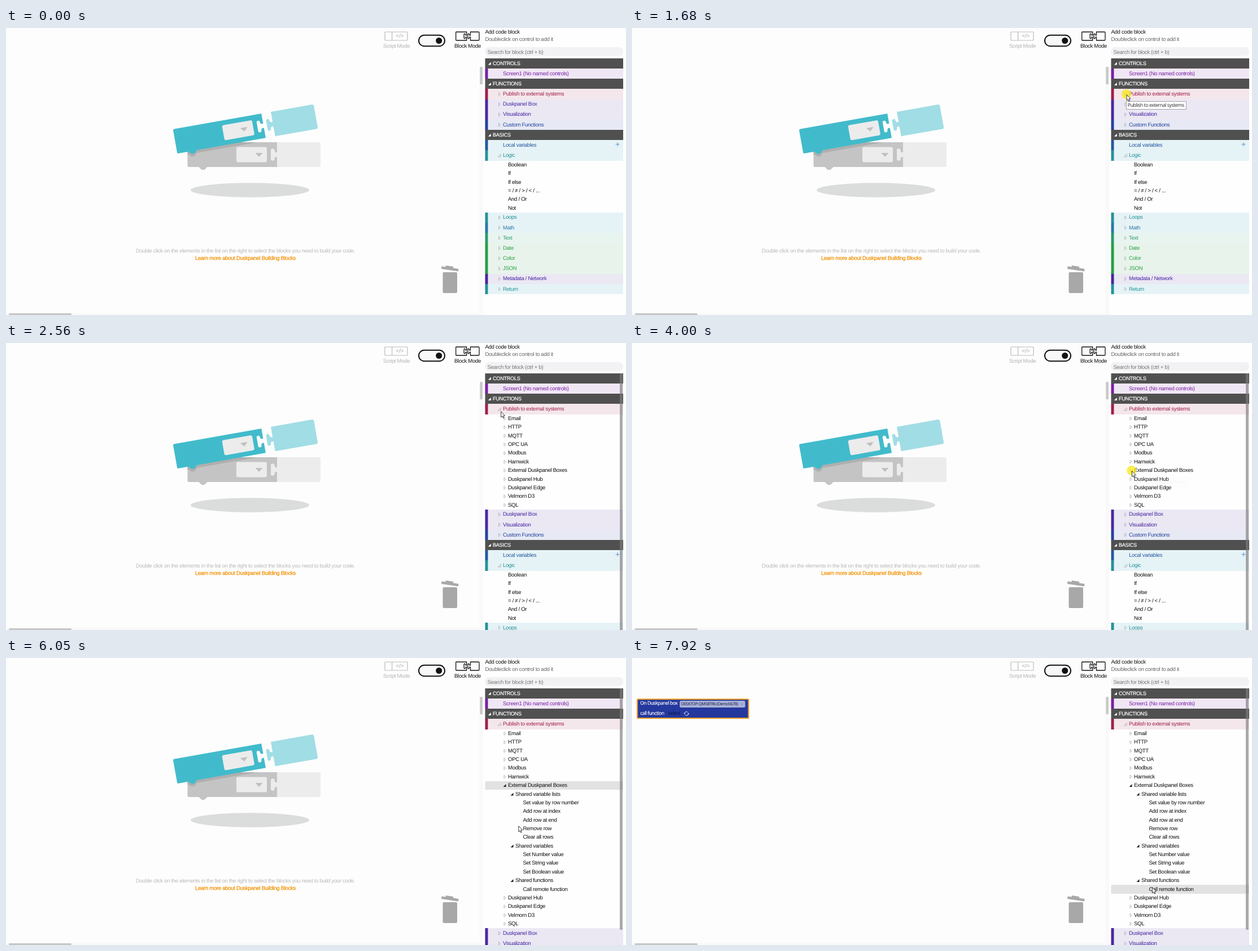
Write an HTML page with a canvas that moves like this. It is 1098x510 px and loops after 8000 ms.

```html
<!DOCTYPE html>
<html lang="en">
<head>
<meta charset="utf-8">
<title>Adding a code block</title>
<style>
  html, body { margin: 0; height: 100%; overflow: hidden; background: #fdfdfd; }
  canvas { display: block; }
</style>
</head>
<body>
<canvas id="stage" width="1098" height="510"></canvas>
<script>
const c = document.getElementById('stage').getContext('2d');
const LOOP = 8000;
const UI = '"Liberation Sans", Arial, sans-serif';
const HINT = '"Open Sans", "Noto Sans", sans-serif';

// ---------- drawing helpers ----------
function text(str, x, y, color, { size = 9.6, font = UI, gap = -0.32, align = 'left', bold = 0 } = {}) {
  c.font = `${size}px ${font}`;
  c.letterSpacing = gap + 'px';
  c.textRendering = 'geometricPrecision';
  c.textBaseline = 'middle';
  c.textAlign = align;
  c.fillStyle = c.strokeStyle = color;
  c.fillText(str, x, y);
  if (bold) { c.lineWidth = bold; c.strokeText(str, x, y); }
}

function box(x, y, w, h, color, r = 0) {
  c.fillStyle = color;
  c.beginPath();
  c.roundRect(x, y, w, h, r);
  c.fill();
}

function outline(x, y, w, h, color, width, r = 0) {
  c.strokeStyle = color;
  c.lineWidth = width;
  c.beginPath();
  c.roundRect(x, y, w, h, r);
  c.stroke();
}

function shape(points, fill, stroke, width = 0.8) {
  c.beginPath();
  points.forEach(([x, y]) => c.lineTo(x, y));
  c.closePath();
  if (fill) { c.fillStyle = fill; c.fill(); }
  if (stroke) { c.strokeStyle = stroke; c.lineWidth = width; c.stroke(); }
}

function disc(x, y, rx, ry, color) {
  c.fillStyle = color;
  c.beginPath();
  c.ellipse(x, y, rx, ry, 0, 0, 7);
  c.fill();
}

// Puzzle knob bulging left from a vertical edge; dir 1 runs down, -1 runs up.
function knob(x, y, s, dir) {
  const p = (dx, dy) => [x + dx * s, y + dy * s * dir];
  c.lineTo(...p(0, -4));
  c.quadraticCurveTo(...p(-5, -3), ...p(-5, -7));
  c.quadraticCurveTo(...p(-5, -10.5), ...p(-8, -10.5));
  c.quadraticCurveTo(...p(-11, -10.5), ...p(-11, -8));
  c.lineTo(...p(-11, 8));
  c.quadraticCurveTo(...p(-11, 10.5), ...p(-8, 10.5));
  c.quadraticCurveTo(...p(-5, 10.5), ...p(-5, 7));
  c.quadraticCurveTo(...p(-5, 3), ...p(0, 4));
}

// Block with a socket in its right edge and optionally a foot below.
function socketBlock(x, y, w, h, s, foot) {
  c.beginPath();
  c.moveTo(x + 2 * s, y);
  c.lineTo(x + w, y);
  knob(x + w, y + h / 2, s, 1);
  c.lineTo(x + w, y + h);
  if (foot) [[35, 0], [30, 5], [25, 5], [20, 0]].forEach(([dx, dy]) => c.lineTo(x + dx, y + h + dy));
  c.arcTo(x, y + h, x, y, 2 * s);
  c.arcTo(x, y, x + w, y, 2 * s);
  c.closePath();
}

// Block with a knob on its left edge.
function knobBlock(x, y, w, h, s) {
  c.beginPath();
  c.moveTo(x, y);
  c.arcTo(x + w, y, x + w, y + h, 3 * s);
  c.arcTo(x + w, y + h, x, y + h, 3 * s);
  c.lineTo(x, y + h);
  knob(x, y + h / 2, s, -1);
  c.closePath();
}

function fill(color) { c.fillStyle = color; c.fill(); }

// ---------- work area ----------
function blockPair(color, light, rightX, arrowX) {
  socketBlock(0, 0, 159, 44, 1, true);
  fill(color);
  knobBlock(rightX, 0, 77, 44, 1);
  fill(light);
  box(86.5, 8.5, 54, 27, '#ececec', 3);
  shape([[arrowX - 6.5, 19], [arrowX + 6.5, 19], [arrowX, 26]], '#c0c0c0');
}

function illustration() {
  const tilt = () => { c.translate(295.7, 179.9); c.rotate(-10.1 * Math.PI / 180); };
  disc(432, 288, 105, 12.7, '#dbdcdc');
  c.save();
  c.translate(321.5, 203);
  blockPair('#c4c4c4', '#ececec', 158.5, 126.5);
  c.restore();

  c.save();
  c.beginPath();
  c.rect(321.5, 203, 158.5, 44);
  c.clip();
  c.translate(0, 5);
  tilt();
  socketBlock(0, 0, 159, 44, 1, true);
  fill('#afafaf');
  c.restore();

  c.save();
  tilt();
  blockPair('#41bbcb', '#a1dde5', 176, 124);
  c.restore();

  text('Double click on the elements in the list on the right to select the blocks you need to build your code.',
    424, 396, '#b9b9b9', { align: 'center' });
  text('Learn more about Duskpanel Building Blocks', 424, 409, '#f39200', { align: 'center', bold: 0.25 });
}

function newBlock() {
  box(9, 73, 198, 34.5, '#24389e', 1);
  outline(9.4, 73.3, 197, 33.8, '#f39a22', 2, 1);
  const label = { size: 8.6, font: HINT, gap: -0.48, bold: 0.2 };
  text('On Duskpanel box', 14.5, 81, '#fff', label);
  box(84.5, 76, 116, 12, '#a8b1d8', 2.5);
  text('DESKTOP-QM58TR6 (Demo5678)', 87, 82, '#10163a', { size: 7.3, font: HINT, gap: -0.4 });
  shape([[192.7, 81], [196.7, 81], [194.7, 83.5]], '#7480b8');
  text('call function', 14.5, 98.5, '#fff', label);
  text('select', 64, 98.5, '#0a1140', { ...label, gap: -0.3, bold: 0 });
  c.strokeStyle = '#dfe3f5';
  c.lineWidth = 1;
  for (const a of [0.3, Math.PI + 0.3]) {
    c.beginPath();
    c.arc(96.5, 98.8, 3.3, a, a + 2.3);
    c.stroke();
  }
  shape([[92, 97.5], [95, 97.5], [92.5, 100]], '#dfe3f5');
  shape([[101, 100], [98, 100], [100.5, 97.5]], '#dfe3f5');
}

function toolbar() {
  outline(671, 7, 40, 15, '#bbb', 1.2, 1);
  box(683, 7, 1.2, 15, '#bbb');
  text('</>', 697.5, 14.5, '#aaa', { align: 'center', gap: 0 });
  text('Script Mode', 691.5, 32.5, '#b4b4b4', { align: 'center' });

  box(731, 12.8, 46, 19.4, '#f8f8f8', 9.7);
  outline(731, 12.8, 46, 19.4, '#111', 2, 9.7);
  disc(766.7, 22.5, 5.5, 5.5, '#111');

  c.strokeStyle = '#111';
  c.lineWidth = 1.3;
  socketBlock(796.7, 7, 19, 15, 0.42);
  c.stroke();
  knobBlock(822.5, 7, 15.5, 15, 0.42);
  c.stroke();
  text('Block Mode', 817.5, 32.5, '#111', { align: 'center' });
}

function workArea(placed) {
  box(838.5, 72, 6.5, 434, '#f9f9f9');
  box(0, 506, 845, 4, '#f9f9f9');
  box(839.3, 69, 4.6, 31, '#c9c9c9', 1);
  box(5, 507, 111, 3, '#c6c6c6', 1.5);
  shape([[771.5, 423.5], [778.5, 424.5], [779, 422], [792, 424], [792, 426.5], [801.5, 428], [801, 432.5], [771, 428]], '#a8a8a8');
  box(773.5, 434, 25.5, 37, '#a8a8a8', 2);
  toolbar();
  placed ? newBlock() : illustration();
}

// ---------- block list ----------
const CYAN = '#1a90b0', TEAL = '#26929a', VIOLET = '#4a27a0', GREEN = '#26a046';
const head = label => ({ label, head: true });
const group = (label, color, { tint = color, arrow = 'closed', plus } = {}) => ({ label, color, tint, arrow, plus });
const leaf = (label, x = 889, arrow) => ({ label, x, arrow });

const remoteBoxes = [
  ['Shared variable lists', 'Set value by row number', 'Add row at index', 'Add row at end', 'Remove row', 'Clear all rows'],
  ['Shared variables', 'Set Number value', 'Set String value', 'Set Boolean value'],
  ['Shared functions', 'Call remote function'],
].flatMap(([title, ...items]) => [leaf(title, 902, 'solid'), ...items.map(i => leaf(i, 915.5))]);

const REMOTE = 'External Duskpanel Boxes';
const systems = ['Email', 'HTTP', 'MQTT', 'OPC UA', 'Modbus', 'Harnwick', REMOTE,
  'Duskpanel Hub', 'Duskpanel Edge', 'Velmorn D3', 'SQL'];

function listRows(depth) {
  const external = depth < 1 ? [] : systems.flatMap(s => s === REMOTE && depth > 1
    ? [leaf(s, 889, 'solid'), ...remoteBoxes]
    : [leaf(s, 889, 'closed')]);
  return [
    head('CONTROLS'),
    group('Screen1 (No named controls)', '#7b1fa2', { arrow: '' }),
    head('FUNCTIONS'),
    group('Publish to external systems', '#a0204a', { arrow: depth ? 'open' : 'closed' }),
    ...external,
    group('Duskpanel Box', VIOLET),
    group('Visualization', VIOLET),
    group('Custom Functions', '#2440a0'),
    head('BASICS'),
    group('Local variables', '#2458a0', { tint: CYAN, arrow: '', plus: true }),
    group('Logic', TEAL, { tint: CYAN, arrow: 'open' }),
    ...['Boolean', 'If', 'If else', '= / ≠ / > / < / ...', 'And / Or', 'Not'].map(s => leaf(s)),
    group('Loops', TEAL, { tint: CYAN }),
    group('Math', '#2a78a8', { tint: CYAN }),
    group('Text', '#2a9a70'),
    ...['Date', 'Color', 'JSON'].map(s => group(s, GREEN)),
    group('Metadata / Network', VIOLET),
    group('Return', TEAL, { tint: CYAN }),
  ];
}

function arrow(kind, x, y, color) {
  if (kind === 'closed') return shape([[x - 1, y - 3], [x + 2.2, y], [x - 1, y + 3]], null, '#a0a0a0', 0.7);
  const corner = [[x + 2.5, y - 2.5], [x + 2.5, y + 2.5], [x - 2.5, y + 2.5]];
  if (kind === 'open') shape(corner, null, '#a0a0a0', 0.7);
  if (kind === 'solid') shape(corner, color);
}

function list(depth, selected) {
  let y = 54;
  for (const row of listRows(depth)) {
    const h = row.x ? 15.37 : 18.15, mid = y + h / 2;
    const top = Math.round(y), height = Math.round(y + h) - top;
    if (row.head) {
      box(848.5, top, 244.5, height, '#505050');
      arrow('solid', 856.3, mid, '#fff');
      text(row.label, 862, mid, '#fff', { size: 9.2, bold: 0.2 });
    } else if (row.x) {
      if (row.label === selected) box(848.5, top, 244.5, height, '#e1e2e1');
      arrow(row.arrow, row.x - 6, mid, '#222');
      text(row.label, row.x, mid, '#111');
    } else {
      c.globalAlpha = 0.1;
      box(848.5, top, 244.5, height, row.tint);
      c.globalAlpha = 1;
      box(848.5, top, 5, height, row.color);
      arrow(row.arrow, 873.7, mid);
      text(row.label, 880, mid, row.color);
      if (row.plus) {
        box(1079.5, mid - 2, 7, 0.9, '#4a86c8');
        box(1082.6, mid - 5, 0.9, 7, '#4a86c8');
      }
    }
    y += h;
  }
  if (depth) box(1087, 54, 5, depth > 1 ? 429 : 460, 'rgba(125,125,125,.65)', 2);
}

function panel(depth, selected) {
  box(845.5, 0, 252.5, 510, '#fefefe');
  text('Add code block', 848.5, 7, '#111');
  text('Doubleclick on control to add it', 848.5, 20, '#666');
  box(848, 34, 245, 15.7, '#f2f2f5', 7);
  text('Search for block (ctrl + b)', 852.5, 43, '#777');
  list(depth, selected);
}

function tooltip(label, x, y, w, alpha) {
  if (alpha <= 0) return;
  c.globalAlpha = Math.min(alpha, 1);
  box(x, y, w, 14.5, '#fff');
  outline(x + 0.5, y + 0.5, w - 1, 14, '#8c8c8c', 0.8);
  text(label, x + 2.8, y + 7.5, '#222', { size: 8.7, font: HINT, gap: -0.4 });
  c.globalAlpha = 1;
}

// ---------- pointer ----------
// bend lets x run ahead of y; skew below 1 speeds up the start.
const moves = [
  { start: 30, end: 1130, from: [1009, 490], to: [875.7, 118], bend: 1.4, skew: 0.7 },
  { start: 2500, end: 3750, from: [875.7, 118], to: [885, 227], bend: 1, skew: 0.75 },
  { start: 5530, end: 6750, from: [885, 227], to: [932.3, 408.5], bend: 0.35, skew: 1 },
];

function pointerAt(t) {
  if (t >= 7920) return [921, 407];
  if (t >= 7550) return [932.3, t < 7720 ? 409 : t < 7770 ? 410 : 411];
  const m = moves.findLast(m => t >= m.start) || moves[0];
  const p = Math.min(Math.max((t - m.start) / (m.end - m.start), 0), 1) ** m.skew;
  const q = p * p * (3 - 2 * p);
  const ahead = q + m.bend * q * (1 - q);
  return [m.from[0] + (m.to[0] - m.from[0]) * ahead, m.from[1] + (m.to[1] - m.from[1]) * q];
}

const clicks = [[1680, 1830], [4000, 4140], [7080, 7170], [7320, 7400]];

function pointer(t) {
  if (t < 70) return;
  const [x, y] = pointerAt(t);
  if (clicks.some(([a, b]) => t >= a && t < b)) disc(x - 0.3, y - 0.5, 8.5, 8.5, 'rgba(250,232,20,.75)');
  c.save();
  c.translate(x, y);
  shape([[0.4, 0.5], [0.4, 10.8], [2.7, 8.7], [4.2, 12.2], [5.8, 11.5], [4.3, 8.1], [7.4, 7.8]], '#fff', '#222', 0.9);
  c.restore();
}

function draw(t) {
  const depth = t < 1750 ? 0 : t < 4070 ? 1 : 2;
  const selected = depth < 2 ? '' : t < 7080 ? REMOTE : 'Call remote function';
  box(0, 0, 1098, 510, '#fdfdfd');
  workArea(t >= 7400);
  panel(depth, selected);
  if (depth === 0) tooltip('Publish to external systems', 875, 130, 107, (t - 1230) / 290);
  if (depth === 1 && t >= 4000) tooltip(REMOTE, 885, 240, 103, 0.05);
  pointer(t);
}

function tick(now) {
  draw(now % LOOP);
  requestAnimationFrame(tick);
}
requestAnimationFrame(tick);
</script>
</body>
</html>
```
